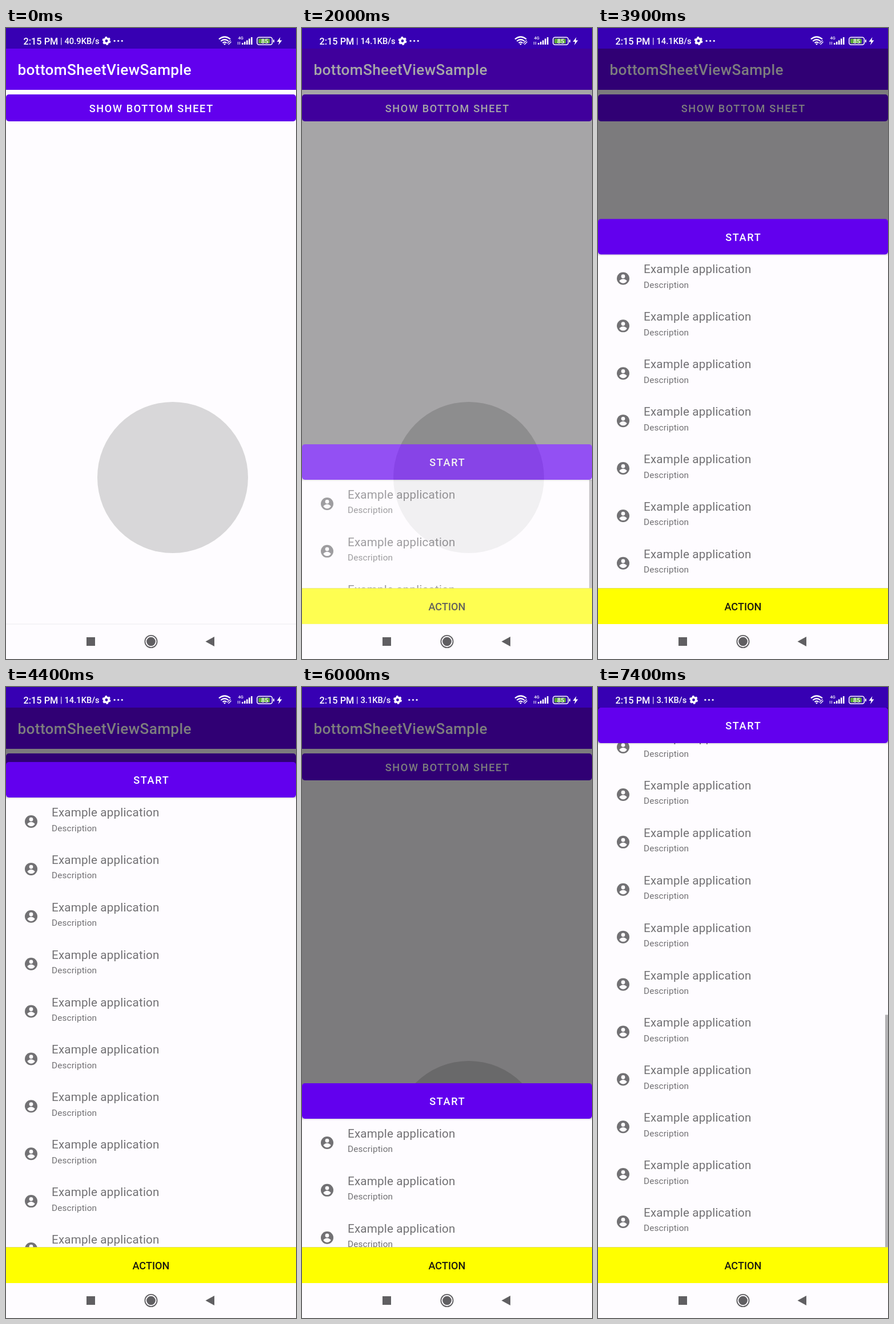
An HTML page for the animation above (8 s loop, 508 by 1102 pixels).

```html
<!DOCTYPE html>
<html lang="en">
<head>
<meta charset="utf-8">
<title>Bottom sheet</title>
<style>
  html, body { margin: 0; width: 100%; height: 100%; overflow: hidden; background: #fefcff; }
  svg { display: block; width: 100vw; height: 100vh; font-family: Roboto, "Noto Sans", sans-serif; }
  .medium { font-weight: 500; }
  .button { font-weight: 500; font-size: 18.15px; letter-spacing: 1.62px; text-anchor: middle; fill: #fff; }
  .name { font-size: 20.6px; letter-spacing: .19px; fill: #727174; }
  .note { font-size: 15.4px; letter-spacing: .12px; fill: #727174; }
</style>
</head>
<body>
<svg viewBox="0 0 508 1102">
  <defs>
    <clipPath id="window"><rect y="36" width="508" height="942.5"/></clipPath>
    <clipPath id="listArea"><rect y="56" width="508" height="1100"/></clipPath>
    <linearGradient id="shade" x2="0" y2="1">
      <stop stop-color="#000" stop-opacity=".22"/>
      <stop offset="1" stop-color="#000" stop-opacity="0"/>
    </linearGradient>
    <g id="row">
      <circle cx="44" cy="42" r="11" fill="#727174"/>
      <circle cx="44" cy="38.2" r="3.4" fill="#fefcff"/>
      <path d="M37.3 46.3Q40 42.8 44 42.8T50.7 46.3Q48 50.2 44 50.2T37.3 46.3Z" fill="#fefcff"/>
      <text class="name" x="80" y="33">Example application</text>
      <text class="note" x="80" y="58.5">Description</text>
    </g>
  </defs>

  <!-- page -->
  <rect width="508" height="1102" fill="#fefcff"/>
  <circle cx="292" cy="785" r="132" fill="#d8d7d9"/>
  <rect y="36" width="508" height="72" fill="#6200ee"/>
  <text class="medium" x="20.5" y="82" font-size="26.2" letter-spacing=".35" fill="#fff">bottomSheetViewSample</text>
  <rect y="116" width="508" height="47" rx="5" fill="#6200ee"/>
  <text class="button" x="254.8" y="146.5">SHOW BOTTOM SHEET</text>

  <!-- dialog -->
  <g id="dialog">
    <rect y="36" width="508" height="1005" fill="#000" opacity=".51"/>
    <g clip-path="url(#window)">
      <g id="sheet">
        <rect y="30" width="508" height="1000" fill="#fefcff"/>
        <g clip-path="url(#listArea)">
          <g id="list"></g>
          <rect id="thumb" x="503" width="5" fill="#b3b2b4"/>
        </g>
        <rect y="60" width="508" height="5" fill="url(#shade)"/>
        <rect width="508" height="62" rx="5" fill="#6200ee"/>
        <text class="button" x="254.8" y="38.3">START</text>
      </g>
    </g>
    <rect y="978.5" width="508" height="62.5" fill="#ff0"/>
    <text class="medium" x="254" y="1017" font-size="18.15" text-anchor="middle" fill="#1c1b10">ACTION</text>
  </g>

  <!-- status bar -->
  <rect width="508" height="36" fill="#3700b3"/>
  <g fill="#fff">
    <text class="medium" x="30.5" y="28.5" font-size="16.3">2:15 PM</text>
    <text x="95" y="28" font-size="15">|</text>
    <text class="medium" id="speed" x="102.5" y="28.3" font-size="14.7"></text>
    <g id="gear" fill="none" stroke="#fff">
      <circle cy="22.5" r="4.2" stroke-width="3.6"/>
      <circle cy="22.5" r="6.2" stroke-width="2.4" stroke-dasharray="3.4 3.09"/>
    </g>
    <g id="dots">
      <circle cx="-6.6" cy="22.5" r="1.6"/><circle cy="22.5" r="1.6"/><circle cx="6.6" cy="22.5" r="1.6"/>
    </g>
    <g fill="none" stroke="#fff" stroke-width="2.2">
      <path d="M373 19.5Q383 11.5 393 19.5M376.3 23Q383 17.5 389.7 23M379.5 26Q383 23.3 386.5 26"/>
      <path d="M387.5 27L393.5 21.5M389.5 29L394.5 24" stroke-width="1.2"/>
      <path d="M406.5 24V29M409.5 24V29" stroke-width="1"/>
    </g>
    <path d="M380.8 27.3H385.2L383 30Z"/>
    <text class="medium" x="406.5" y="20.3" font-size="7.5">4G</text>
    <path d="M413 26h2.6v3h-2.6zM417 24h2.6v5h-2.6zM421 21.5h2.6v7.5h-2.6zM425 18.5h2.6v10.5h-2.6zM429 16h2.6v13h-2.6z"/>
    <rect x="439.8" y="16.3" width="26.6" height="13" rx="3.5" fill="none" stroke="#fff" stroke-width="1.6"/>
    <rect x="442" y="18.5" width="20" height="8.6" rx="1.5" fill="#5aa63a"/>
    <rect x="468" y="20.3" width="2" height="5" rx="1"/>
    <text class="medium" x="453.2" y="26.8" font-size="11" text-anchor="middle">85</text>
    <path d="M480.5 16L474.5 24H478.5L477 30L483.5 21.5H479.5Z"/>
  </g>

  <!-- navigation bar -->
  <rect y="1041" width="508" height="61" fill="#fefcff"/>
  <rect y="1040.5" width="508" height="1" fill="#ededef" id="divider"/>
  <g fill="#605f62">
    <rect x="141" y="1064" width="15" height="15"/>
    <circle cx="254" cy="1071.5" r="10.6" fill="none" stroke="#605f62" stroke-width="1.8"/>
    <circle cx="254" cy="1071.5" r="7.8"/>
    <path d="M349.5 1071.5L365 1063V1080Z"/>
  </g>
</svg>
<script>
const LOOP = 8000, STEP = 100;
const ROWS = 23, PITCH = 82.89, LIST_TOP = 62, LIST_HEIGHT = 880;
const MAX_SCROLL = 1029.6, CONTENT = LIST_HEIGHT + MAX_SCROLL;
const PEEK = 717, HELD = 131, FULL = 36;

const $ = id => document.getElementById(id);
const progress = (t, a, b) => Math.min(1, Math.max(0, (t - a) / (b - a)));
const smooth = (t, a, b) => (1 - Math.cos(Math.PI * progress(t, a, b))) / 2;
const fling = (t, a, b) => 1 - (1 - progress(t, a, b)) ** 3;
const move = (id, x, y) => $(id).setAttribute("transform", `translate(${x} ${y})`);

for (let i = 0; i < ROWS; i++) {
  const row = document.createElementNS("http://www.w3.org/2000/svg", "use");
  row.setAttribute("href", "#row");
  row.setAttribute("y", LIST_TOP + i * PITCH);
  $("list").append(row);
}
$("thumb").setAttribute("height", LIST_HEIGHT ** 2 / CONTENT);

function draw(t) {
  const shown = smooth(t, 1846, 2096);
  const sheetY = PEEK + 31 * (1 - shown)
    + (HELD - PEEK) * (smooth(t, 3300, 4300) - smooth(t, 5100, 5600))
    + (FULL - PEEK) * smooth(t, 5930, 6500);
  const scroll = MAX_SCROLL * fling(t, 6850, 7400);

  $("dialog").setAttribute("opacity", shown);
  $("divider").setAttribute("opacity", 1 - shown);
  move("sheet", 0, sheetY);
  move("list", 0, -scroll);
  $("thumb").setAttribute("y", LIST_TOP + scroll * LIST_HEIGHT / CONTENT);
  $("thumb").setAttribute("opacity", t < 6900 ? 1 - progress(t, 3300, 3600) : 1);

  const late = t >= 5100;
  $("speed").textContent = late ? "3.1KB/s" : t >= 1100 ? "14.1KB/s" : "40.9KB/s";
  move("gear", late ? 167.5 : 176, 0);
  move("dots", late ? 194.5 : 196.7, 0);
}

function frame(now) {
  draw(Math.floor(now % LOOP / STEP) * STEP);
  requestAnimationFrame(frame);
}
draw(0);
requestAnimationFrame(frame);
</script>
</body>
</html>
```
